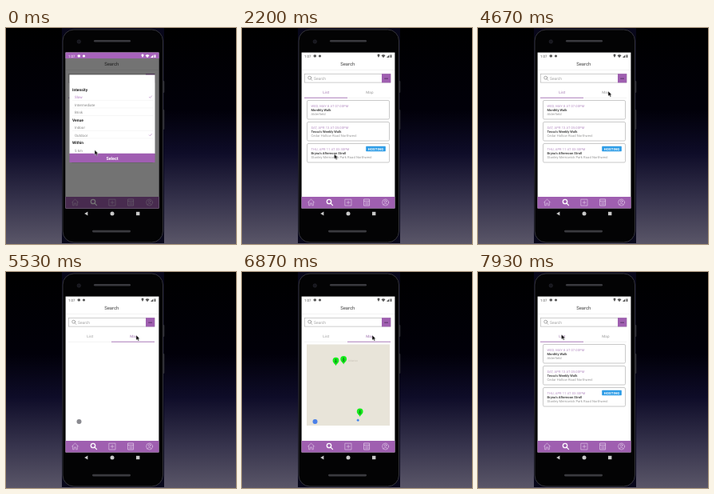
Animation, 288 px wide and 270 px high, one loop 8 s. Source, as an HTML page:

```html
<!DOCTYPE html>
<html lang="en">
<head>
<meta charset="utf-8">
<title>Walk search</title>
<style>
  html, body { margin: 0; width: 288px; height: 270px; overflow: hidden; background: #000; }
  svg { display: block; }
  text { font-family: Roboto, "Liberation Sans", sans-serif; text-rendering: geometricPrecision; }
  .line { fill: none; stroke-linecap: round; stroke-linejoin: round; }
</style>
</head>
<body>
<svg id="stage" width="288" height="270" viewBox="0 0 288 270">
  <defs>
    <linearGradient id="sky" x1="0" y1="0" x2="0" y2="1">
      <stop offset="0" stop-color="#000"/>
      <stop offset=".38" stop-color="#010009"/>
      <stop offset=".58" stop-color="#0e0c28"/>
      <stop offset=".8" stop-color="#36334c"/>
      <stop offset="1" stop-color="#5a5668"/>
    </linearGradient>
    <clipPath id="pageClip"><rect x="75" y="88" width="116" height="123"/></clipPath>
    <g id="pin">
      <path d="M0 6 C-.6 3.6 -3.9 2.6 -3.9 -.6 A3.9 3.9 0 0 1 3.9 -.6 C3.9 2.6 .6 3.6 0 6z" fill="#16ee1c"/>
      <circle cy="-1.8" r=".8" fill="#0b6b18"/>
      <path class="line" d="M0 -1 V1 L-1 2.6 M0 1 L1 2.6 M-1.3 .2 H1.3" stroke="#0b6b18" stroke-width=".6"/>
    </g>
  </defs>

  <rect width="288" height="270" fill="url(#sky)"/>

  <!-- phone body -->
  <rect x="70" width="128" height="269" fill="#08071a"/>
  <rect x="196" y="66" width="2.4" height="15" rx="1" fill="#2c2c33"/>
  <rect x="196" y="102" width="2.4" height="25" rx="1" fill="#2c2c33"/>
  <rect x="71" y="2" width="125.5" height="266" rx="14" fill="#030304" stroke="#34343b"/>
  <g fill="#3a3a3f">
    <rect x="110" y="15" width="46" height="2.6" rx="1.3"/>
    <rect x="108" y="252.8" width="48" height="2.6" rx="1.3"/>
  </g>
  <circle cx="91.3" cy="17" r="2.2" fill="#16161c" stroke="#2b2b34" stroke-width=".6"/>
  <g fill="#c9c9c9">
    <path d="M98.2 232 L102.4 229.4 V234.6z"/>
    <circle cx="133" cy="232" r="2.5"/>
    <rect x="163" y="229.8" width="4.4" height="4.4"/>
  </g>

  <!-- search screen -->
  <rect x="74.6" y="30.6" width="116.8" height="194.8" fill="#fff"/>
  <text x="132.2" y="46.8" font-size="5.9" text-anchor="middle" fill="#444">Search</text>
  <path d="M75 52.5 H191" stroke="#e9e9e9" stroke-width=".6"/>
  <rect x="78.5" y="57.5" width="107.5" height="10.6" fill="#fff" stroke="#b9b9b9" stroke-width=".7"/>
  <rect x="175" y="57.2" width="11.2" height="11.2" fill="#9f5fb0"/>
  <path class="line" d="M178.6 63.2 H182.6" stroke="#4c2a58" stroke-width=".8"/>
  <g class="line" stroke="#888" stroke-width=".7"><circle cx="84.7" cy="62.2" r="2"/><path d="M86.2 63.8 L87.8 65.4"/></g>
  <text x="90" y="64.5" font-size="4.9" fill="#a2a2a2">Search</text>
  <text id="listTab" x="105.3" y="81.5" font-size="4.6" text-anchor="middle" letter-spacing=".2">List</text>
  <text id="mapTab" x="160" y="81.5" font-size="4.6" text-anchor="middle" letter-spacing=".2">Map</text>
  <path d="M78 87.4 H186" stroke="#e6e6e6" stroke-width=".5"/>
  <rect id="underline" x="78" y="86.8" width="54" height=".9" fill="#a772b7"/>

  <g clip-path="url(#pageClip)">
    <g id="pages">
      <g id="cards"></g>
      <g transform="translate(116 0)">
        <rect id="land" x="81" y="90.5" width="104" height="101.5" fill="#e8e4d9"/>
        <circle id="badge" cx="91.5" cy="187" r="3"/>
        <g id="pins">
          <text x="133" y="111.6" font-size="3.2" fill="#c3bfb4">Alderton</text>
          <use href="#pin" x="117.5" y="111.3"/>
          <use href="#pin" x="127.2" y="109.6"/>
          <use href="#pin" x="147.7" y="175"/>
          <circle cx="145.2" cy="185.3" r="1.7" fill="#3f7fe0" stroke="#fff" stroke-width=".4"/>
        </g>
      </g>
    </g>
  </g>

  <!-- bottom bar -->
  <rect x="74.6" y="211" width="116.8" height="14.4" fill="#9f5fb0"/>
  <g class="line" stroke="#dfc6e7" stroke-width=".65">
    <path d="M82.5 218 L86.5 214 L90.5 218 M83.6 217.2 V221.8 H85.4 V219 H87.6 V221.8 H89.4 V217.2"/>
    <g stroke="#fff" stroke-width="1.3"><circle cx="109" cy="217" r="2.7"/><path d="M111.1 219.1 L113.5 221.6"/></g>
    <path d="M129.2 214.2 H137 V222 H129.2z M133.1 216.2 V220 M131.2 218.1 H135"/>
    <path stroke-width=".8" d="M153 214 H159.6 V222 H153z M153 216.4 H159.6 M154.8 218.4 H156 M157 218.4 H158 M154.8 220.2 H156 M157 220.2 H158"/>
    <circle cx="179.6" cy="218" r="4"/><circle cx="179.6" cy="216.7" r="1.4"/><path d="M177 220.8 Q179.6 217.6 182.2 220.8"/>
  </g>

  <!-- filter dialog -->
  <g id="dialog">
    <rect x="74.6" y="38" width="116.8" height="187.4" opacity=".55"/>
    <rect x="79.5" y="58.5" width="107" height="98.5" fill="#fff"/>
    <g id="options"></g>
    <rect x="79.5" y="156.8" width="107" height="11.2" fill="#a05eb2"/>
    <text x="133" y="164.6" font-size="5.4" font-weight="700" text-anchor="middle" fill="#fff">Select</text>
  </g>

  <!-- status bar -->
  <rect id="statusBar" x="74.6" y="30.6" width="116.8" height="7.4" fill="#a763bb"/>
  <g id="statusIcons">
    <text x="78" y="36.8" font-size="4.4">1:07</text>
    <rect x="89.7" y="33.4" width="3.2" height="3.2" rx=".8"/>
    <circle cx="97.5" cy="35" r="1.6"/>
    <path d="M171 37 l-1.3 -2.3 a1.5 1.5 0 1 1 2.6 0z M177 37.2 l-2.5 -3 q2.5 -1.8 5 0z M181 37 h3.4 v-3.6z M185.6 33.6 h1.8 v3.5 h-1.8z"/>
  </g>

  <path id="cursor" d="M0 0 V6.2 L1.5 4.9 L2.6 7.2 L3.7 6.7 L2.7 4.5 H4.6z" fill="#000" stroke="#fff" stroke-width=".45"/>
</svg>

<script>
const LOOP = 8000, ACTIVE = '#9d70ad', GREY = '#969696';
const $ = id => document.getElementById(id);

function add(parent, tag, attrs, label) {
  const el = document.createElementNS('http://www.w3.org/2000/svg', tag);
  for (const key in attrs) el.setAttribute(key, attrs[key]);
  if (label) el.textContent = label;
  parent.append(el);
}

const write = (parent, x, y, size, fill, label, more) =>
  add(parent, 'text', { x, y, 'font-size': size, fill, ...more }, label);

const events = [
  ['WED, MAY 8 AT 07:00PM', 'Monthly Walk', 'Alderfield'],
  ['SAT, APR 13 AT 05:00PM', "Tessa's Weekly Walk", 'Cedar Hollow Road Northwest'],
  ['THU, APR 11 AT 03:30PM', "Bryna's Afternoon Stroll", 'Stanley Merrowick Park Road Northwest'],
];
events.forEach(([date, title, place], i) => {
  const y = 90.5 + 27 * i, cards = $('cards');
  add(cards, 'rect', { x: 81.5, y, width: 103, height: 23.5, rx: 1.5, fill: '#fff', stroke: '#bcbcbc', 'stroke-width': .8 });
  write(cards, 86.5, y + 8.1, 4, '#b48cc2', date, { 'letter-spacing': .12 });
  write(cards, 86.5, y + 13.7, 4.1, '#4a4a4a', title, { 'font-weight': 700 });
  write(cards, 86.5, y + 18.7, 4.1, '#949494', place, { 'letter-spacing': .08 });
});
add($('cards'), 'rect', { x: 155.2, y: 147.8, width: 24.6, height: 6.4, rx: .6, fill: '#2d9ce6' });
write($('cards'), 167.5, 152.5, 4.2, '#fff', 'HOSTING', { 'font-weight': 700, 'text-anchor': 'middle', 'letter-spacing': .2 });

// Leading # marks a heading, trailing * a chosen option.
['#Intensity', 'Slow*', 'Intermediate', 'Brisk', '#Venue', 'Indoor', 'Outdoor*', '#Within', '5 km'].forEach((item, i) => {
  const y = 78.6 + 9.5 * i, box = $('options');
  if (item[0] === '#') return write(box, 83, y, 4.9, '#222', item.slice(1), { 'font-weight': 700 });
  const chosen = item.endsWith('*');
  write(box, 86, y, 4.5, i === 1 ? '#b27cc2' : '#858585', item.replace('*', ''));
  add(box, 'path', { d: `M83 ${y + 2.3} H185`, stroke: '#e8e8e8', 'stroke-width': .4 });
  if (chosen) add(box, 'path', { class: 'line', d: `M179.4 ${y - 1.8} l1 1.1 l2 -2.5`, stroke: '#b27cc2', 'stroke-width': .6 });
});

// Each step is [time, value]; values are held before the first and after the last.
const tracks = [];
function track(id, prop, steps, format = v => v) {
  const last = steps[steps.length - 1];
  const frames = [[0, steps[0][1]], ...steps, [LOOP, last[1]]]
    .map(([ms, v]) => ({ offset: ms / LOOP, [prop]: format(v) }));
  tracks.push($(id).animate(frames, { duration: LOOP, iterations: Infinity }));
}
const move = ([x, y]) => `translate(${x}px, ${y}px)`;
const shift = x => `translate(${x}px, 0px)`;

track('cursor', 'transform', [
  [70, [111, 152.5]], [500, [113.3, 161]], [1800, [113.3, 161]], [2130, [115.5, 157.5]],
  [3533, [115.5, 157.5]], [4200, [163, 79]],
  [6930, [163, 79]], [7530, [104.5, 78]],
], move);
track('dialog', 'opacity', [[790, 1], [1110, 0]]);
track('statusBar', 'opacity', [[790, 1], [860, 0]]);
track('statusIcons', 'fill', [[930, '#ffffff'], [1110, '#555555']]);

const toMap = [5220, 5460], toList = [7690, 7900];
const tabs = (a, b) => [[toMap[0], a], [toMap[1], b], [toList[0], b], [toList[1], a]];
track('pages', 'transform', tabs(0, -116), shift);
track('underline', 'transform', tabs(0, 54), shift);
track('listTab', 'fill', tabs(ACTIVE, GREY));
track('mapTab', 'fill', tabs(GREY, ACTIVE));

track('land', 'opacity', [[6050, 0], [6250, 1]]);
track('badge', 'fill', [[6050, '#8a8a90'], [6250, '#4a80e8']]);
track('pins', 'opacity', [[6300, 0], [6301, 1]]);

const start = document.timeline.currentTime;
tracks.forEach(t => { t.startTime = start; });
</script>
</body>
</html>
```
